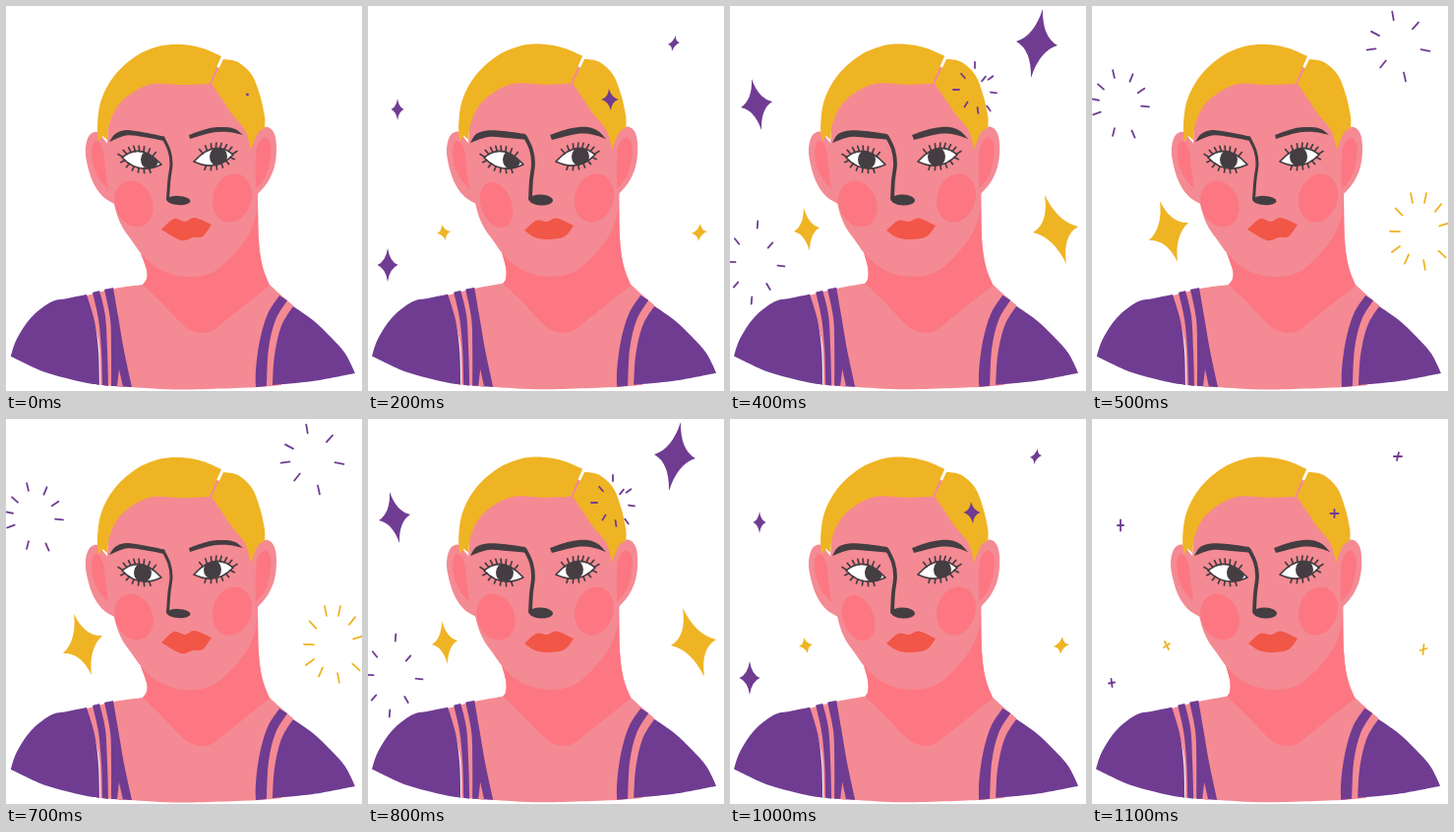
Animation of 362x391 px, one loop 1.2 s. Source, as an HTML page with a canvas:

```html
<!DOCTYPE html>
<html lang="en">
<head>
<meta charset="utf-8">
<title>Portrait with sparkles</title>
<style>
html, body { margin: 0; width: 100%; height: 100%; overflow: hidden; background: #fff; }
canvas { display: block; }
</style>
</head>
<body>
<canvas id="stage" width="362" height="391"></canvas>
<script>
const ctx = document.getElementById('stage').getContext('2d');
const SKIN = '#f48a93', SHADE = '#fc7782', PURPLE = '#6f3c92', GOLD = '#efb424',
      DARK = '#443d42', LIP = '#f15647';
const STEP = 100, STEPS = 12;

const points = text => text.trim().split(/\s+/).map(p => p.split(',').map(Number));

// Smooth runs of points; "|" marks a sharp corner between runs.
function outline(text) {
  const path = new Path2D();
  let last = null;
  for (const part of text.split('|')) {
    const run = points(part);
    if (last) run.unshift(last);
    else path.moveTo(...run[0]);
    for (let i = 0; i < run.length - 1; i++) {
      const a = run[Math.max(i - 1, 0)], b = run[i], c = run[i + 1],
            d = run[Math.min(i + 2, run.length - 1)];
      path.bezierCurveTo(b[0] + (c[0] - a[0]) / 6, b[1] + (c[1] - a[1]) / 6,
                         c[0] - (d[0] - b[0]) / 6, c[1] - (d[1] - b[1]) / 6, c[0], c[1]);
    }
    last = run[run.length - 1];
  }
  return path;
}

function fill(text, color) {
  ctx.fillStyle = color;
  ctx.fill(outline(text));
}

function stroke(text, color, width) {
  ctx.strokeStyle = color;
  ctx.lineWidth = width;
  ctx.stroke(outline(text));
}

function oval(x, y, rx, ry, tilt, color) {
  ctx.fillStyle = color;
  ctx.beginPath();
  ctx.ellipse(x, y, rx, ry, tilt, 0, 7);
  ctx.fill();
}

function line(x1, y1, x2, y2) {
  ctx.beginPath();
  ctx.moveTo(x1, y1);
  ctx.lineTo(x2, y2);
  ctx.stroke();
}

function drawBody(bold) {
  const side = bold ? '137,251 141,266 141,277 138,282' : '137,251 143,268 143,277 139,283';
  fill(side + ' | 110,287 82,294 | 94,340 96,385 | 125,387 180,389.5 260,387 | 280,385 | 292,304' +
       '| 280,294 268,283 | 261,265 257,238 256,190 | 200,200', SKIN);
  fill(side + '| 158,301 176,320 189,330 207,331 226,317 245,302 268,284' +
       '| 261,265 257,238 256,186 | 200,200', SHADE);

  fill('5,355 11,338 25,317 45,301 62,297 82,293 | 90,320 94,350 95,385 | 78,382 40,372 5,356', PURPLE);
  fill('88,291 95,289 | 101,315 103,350 104,386 | 98,385 | 97,350 94,318 88,291', PURPLE);
  fill('100,288 109,286 | 114,315 120,350 128,387 | 107,386 | 107,350 106,318 100,288', PURPLE);
  fill('115,369 | 119,387 | 113,386', SKIN);
  fill('278,294 | 286,299 | 274,319 267,348 265,386 | 254,387 | 254,370 258,340 266,313 278,294', PURPLE);
  fill('292,305 | 312,319 330,336 345,353 355,373 | 312,381 271,385 | 273,355 280,325 292,305', PURPLE);
}

function drawHead(bold) {
  // ears
  fill('100,136 93,128 85,131 81,143 82,158 88,178 98,193 112,202 | 130,170', SKIN);
  fill('248,140 256,126 266,123 273,130 275,145 273,163 266,179 255,192 | 235,170', SKIN);
  // face
  fill('103,138 106,170 110,201 117,222 127,237 138,252 152,265 170,273 190,275 209,271 227,257' +
       ' 245,235 254,213 256,190 | 249,146 | 240,90 210,60 150,60 110,90 103,138', SKIN);
  fill('90,137 87,146 89,163 96,177 104,186 | 101,165 99,148 95,139 90,137', SHADE);
  fill('264,133 257,139 254,153 254,186 | 264,173 269,154 269,140 264,133', SHADE);
  // hair
  fill('94,138 93,120 97,95 110,71 132,51 155,41 178,39 200,43 219,51' +
       '| 207,79 | 180,80 150,79 130,87 114,101 105,120 103,136 | 98,132', GOLD);
  fill('221,54 236,57 250,70 258,90 263,112 263,124 | 256,129 249,146' +
       '| 243,126 230,110 220,95 209,79', GOLD);
}

function drawCheeks(k) {
  if (k === 2) oval(130.5, 202, 15.5, 24, -.35, SHADE);
  else oval(130, 201, k === 3 ? 18 : 19, 24, -.38, SHADE);
  oval(230, 195, 19.5, 25, .3, SHADE);
}

function drawFeatures(bold) {
  if (bold) {
    fill('104,139 | 110,130 121,126.5 138,127 160,130 | 162,136 | 142,134 122,133 104,139', DARK);
    fill('185,131 205,124.5 223,123 234,127 242,135 | 228,130.5 212,130 187,136', DARK);
    stroke('160,133 166,146 168,160 166,177 165,196', DARK, 3.8);
    oval(176, 197, 12, 5.6, .04, DARK);
    fill('159,228 171,218 182,219 192,215.5 209,223 | 200,234 184,237 170,235 159,228', LIP);
  } else {
    fill('105,138 | 111,130 122,126 138,128 161,132.5 | 161,137 | 140,133 122,131.5 105,138', DARK);
    fill('186,131 207,124 223,123 233,125 241,131 | 226,128 208,129 187,135', DARK);
    stroke('160,134 166,147 168,160 166,176 164.5,196', DARK, 3);
    oval(175.5, 197.5, 12, 4.6, .05, DARK);
    fill('158,227 171,216 182,219 192,215 209,222 | 200,234 190,235 178,238 158,227', LIP);
  }
}

// Point on a quadratic curve given as [x0,y0,x1,y1,x2,y2].
function along(q, t) {
  const u = 1 - t;
  return [0, 1].map(i => u * u * q[i] + 2 * u * t * q[i + 2] + t * t * q[i + 4]);
}

function lashes(q, n, from, to, length, originY) {
  for (let i = 0; i < n; i++) {
    const [x, y] = along(q, from + (to - from) * i / (n - 1));
    const dx = x * .55, dy = y - originY, r = Math.hypot(dx, dy);
    line(x, y, x + dx / r * length, y + dy / r * length);
  }
}

function drawEye(x, y, mirror, gaze) {
  const top = [-20, -2, -1, -18, 20, 5], low = [20, 5, -3, 16, -20, -2];
  ctx.save();
  ctx.translate(x, y);
  ctx.scale(mirror, 1);
  ctx.strokeStyle = DARK;
  if (gaze === null) {
    const lid = [-20, 0, 0, 13, 20, 4];
    ctx.lineWidth = 2.6;
    ctx.beginPath();
    ctx.moveTo(lid[0], lid[1]);
    ctx.quadraticCurveTo(...lid.slice(2));
    ctx.stroke();
    ctx.lineWidth = 1.8;
    lashes(lid, 8, .06, .8, 6, -8);
  } else {
    const lids = new Path2D();
    lids.moveTo(-20, -2);
    lids.quadraticCurveTo(...top.slice(2));
    lids.quadraticCurveTo(...low.slice(2));
    ctx.fillStyle = '#fff';
    ctx.fill(lids);
    ctx.save();
    ctx.clip(lids);
    oval(gaze * mirror, 0, 9, 10, 0, DARK);
    ctx.restore();
    ctx.lineWidth = 1.7;
    ctx.stroke(lids);
    lashes(top, 8, .02, .78, 5.5, 4);
    lashes(low, 6, .28, .92, 4.5, -4);
  }
  ctx.restore();
}

// Four-pointed star: (ax,ay) reaches the top tip, (bx,by) the right tip.
function star(color, [x, y, ax, ay, bx, by]) {
  const tips = [[ax, ay], [bx, by], [-ax, -ay], [-bx, -by]];
  ctx.fillStyle = color;
  ctx.beginPath();
  ctx.moveTo(x + ax, y + ay);
  tips.forEach((p, i) => {
    const q = tips[(i + 1) % 4];
    ctx.quadraticCurveTo(x + (p[0] + q[0]) * .2, y + (p[1] + q[1]) * .2, x + q[0], y + q[1]);
  });
  ctx.fill();
}

function cross(color, [x, y, ax, ay, bx, by]) {
  ctx.strokeStyle = color;
  ctx.lineWidth = 1.8;
  line(x - ax, y - ay, x + ax, y + ay);
  line(x - bx, y - by, x + bx, y + by);
}

function burst(color, { x, y, len, at }) {
  ctx.strokeStyle = color;
  ctx.lineWidth = 1.8;
  for (const [px, py] of points(at)) {
    const r = Math.hypot(px - x, py - y) * 2 / len;
    const dx = (px - x) / r, dy = (py - y) / r;
    line(px - dx, py - dy, px + dx, py + dy);
  }
}

// Each sparkle: a cross, then growing stars, then a burst of dashes.
const sparkles = [
  { color: PURPLE, cross: [311, 38, 1, -4, 4, 0],
    stars: [[311, 38, 2, -8, 6, -1], [311.5, 38, 4, -13, 10, -1], [312, 38, 6, -35, 21, 2]],
    burst: { x: 311, y: 40, len: 9, at: '306,10 329,20 339,45 318,72 296,59 284,44 288,28' } },
  { color: PURPLE, cross: [29, 108, 0, -5.5, 3, 0],
    stars: [[30, 105, 0, -11, 6.5, 0], [30, 104, -1, -18, 11, 0], [27, 100, -5, -26, 16, -3]],
    burst: { x: 29, y: 100, len: 8, at: '22,69 40,73 50,86 54,102 42,130 22,128 5,109 9,82 3,95' } },
  { color: PURPLE, cross: [20, 268, -.5, -4, 3, -.5],
    stars: [[20, 263, 0, -17, 10.5, 0], [25, 262, 3, -41, 26, 0]],
    burst: { x: 25, y: 261, len: 7, at: '28,222 41,243 52,264 39,285 22,299 6,283 2,260 7,239' } },
  { color: GOLD, cross: [76, 230, -2, -4, 3, -2],
    stars: [[77, 230, -2, -8, 7, -1], [77.5, 227, -2, -14, 9, 0],
            [78, 227, -3, -22, 13, -2], [78, 229, -9, -31, 20, -9]],
    burst: { x: 77, y: 229, len: 8, at: '70,196 87,199 98,214 101,232 95,250 81,261 65,255 55,240 56,218' } },
  { color: GOLD, cross: [337, 234, .5, -5, 3.5, -1],
    stars: [[337, 230, 1, -9, 8, -1], [335, 227, -6, -21, 12.5, 1], [331, 227, -11, -35, 23, -3]],
    burst: { x: 332, y: 230, len: 10, at: '325,195 339,195 352,205 358,222 356,252 338,263 320,257 309,247 308,229 312,209' } },
  { color: PURPLE, dot: [245.5, 90], cross: [246.5, 96, 0, -4, 4, 0],
    stars: [[246, 95, -1, -11, 8.5, 0], [249, 90, -1, -29, 19, 0]],
    burst: { x: 249, y: 85, len: 6, at: '249,60 258,74 268,88 263,104 252,106 240,100 230,85 237,71 265,73' } }
];

function drawSparkle(s, k) {
  if (k === 0) {
    if (s.dot) oval(...s.dot, 1.4, 1.4, 0, s.color);
  } else if (k === 1) cross(s.color, s.cross);
  else if (k - 2 < s.stars.length) star(s.color, s.stars[k - 2]);
  else if (k - 2 === s.stars.length) burst(s.color, s.burst);
}

function draw(k) {
  const bold = k !== 0 && k !== 5;
  ctx.fillStyle = '#fff';
  ctx.fillRect(0, 0, 362, 391);
  ctx.lineCap = 'round';
  ctx.lineJoin = 'round';
  ctx.save();
  if (bold) ctx.translate(-.8, -.3);
  drawBody(bold);
  drawHead(bold);
  ctx.restore();
  drawCheeks(k);
  drawFeatures(bold);
  const shut = k === 3, aside = k < 3;
  drawEye(138, 156, 1, shut ? null : aside ? 8 : 1);
  drawEye(211, 153, -1, shut ? null : aside ? 5 : -1);
  for (const s of sparkles) drawSparkle(s, k);
}

// The cycle runs forward to its middle, then back.
const start = performance.now();
function tick() {
  const n = Math.floor((performance.now() - start) / STEP) % STEPS;
  draw(Math.min(n, STEPS - n));
  requestAnimationFrame(tick);
}
tick();
</script>
</body>
</html>
```
